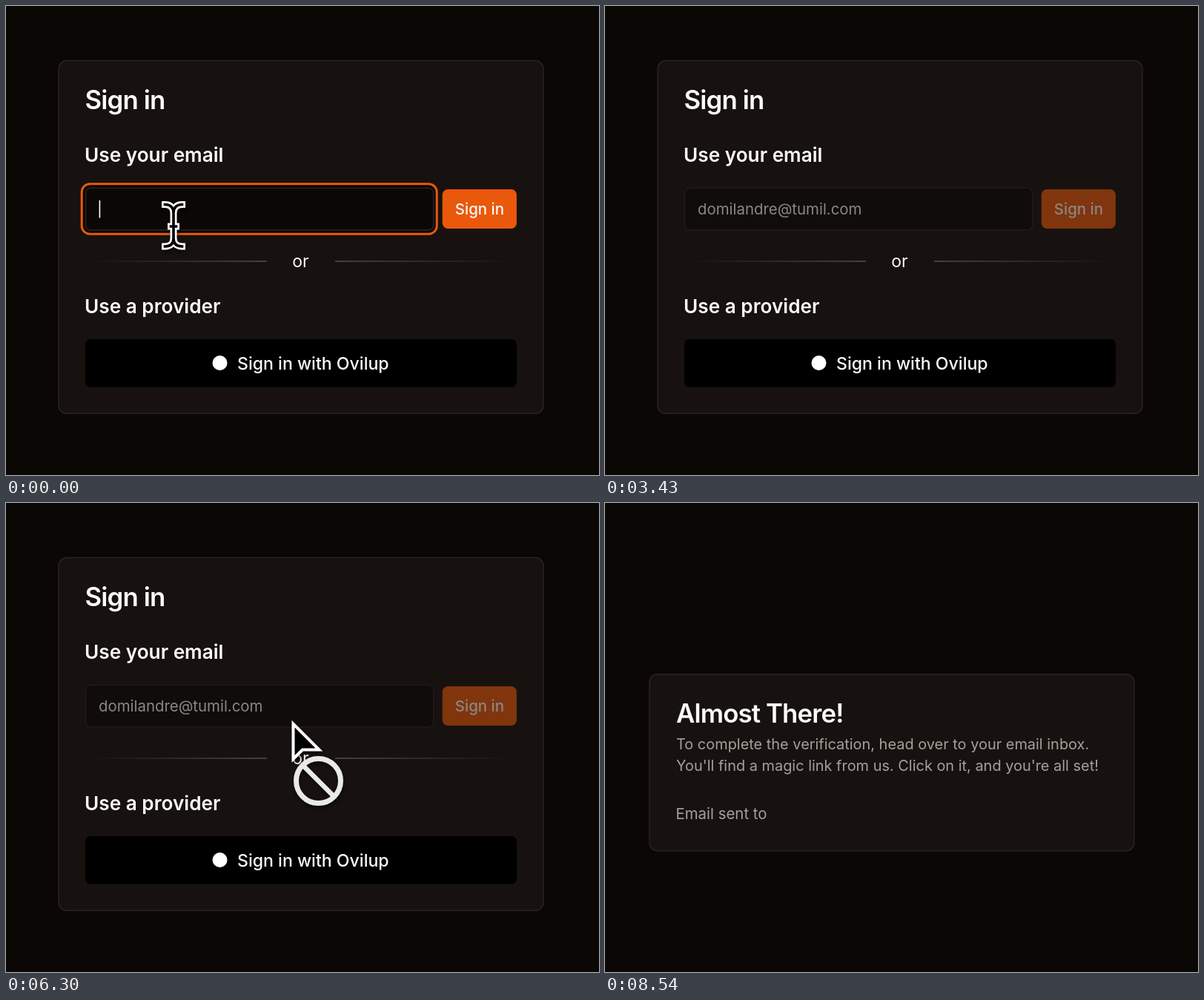
An HTML page for the animation above (9030 ms loop, 800 by 632 pixels).

```html
<!DOCTYPE html>
<html lang="en">
<head>
<meta charset="utf-8">
<title>Sign in</title>
<style>
  html, body { margin: 0; width: 100%; height: 100%; overflow: hidden; background: #0b0704; }
  svg { display: block; width: 100vw; height: 100vh; }
  text { font-family: Inter, "Noto Sans", sans-serif; font-optical-sizing: none; fill: #fafaf9; white-space: pre; }
  .title { font-size: 34.8px; font-weight: 600; letter-spacing: -.025em; }
  .label { font-size: 26.2px; font-weight: 600; }
  .small { font-size: 20.4px; }
  .body { font-size: 19.93px; }
  .medium { font-weight: 500; }
  .muted { fill: #a5a09c; }
  .card { fill: #17120f; stroke: #2b2725; stroke-width: 1.3; }
  .cursor { filter: drop-shadow(1px 3px 2px rgba(0, 0, 0, .55)); }
  .arrow { fill: #000; stroke: #fff; stroke-width: 4; }
  .beam { fill: none; stroke-linecap: square; }
</style>
</head>
<body>
<svg viewBox="0 0 800 632">
  <defs>
    <linearGradient id="fadeIn">
      <stop offset="0" stop-color="#4c4b55" stop-opacity="0"/>
      <stop offset="1" stop-color="#4c4b55"/>
    </linearGradient>
    <linearGradient id="fadeOut">
      <stop offset="0" stop-color="#4c4b55"/>
      <stop offset="1" stop-color="#4c4b55" stop-opacity="0"/>
    </linearGradient>
    <path id="beamShape" d="M214.5 267.5C222 267.5 226 272 226 279V313C226 320 222 324 214.5 324M237.5 267.5C230 267.5 226 272 226 279M226 313C226 320 230 324 237.5 324M222.5 297H229.5"/>
  </defs>
  <rect width="800" height="632" fill="#0b0704"/>

  <g id="form">
    <rect class="card" x="71" y="73.7" width="654" height="475.5" rx="11"/>
    <text class="title" x="106.5" y="139">Sign in</text>
    <text class="label" x="106" y="209.5">Use your email</text>

    <rect id="ring" x="102.2" y="239.8" width="479" height="67.4" rx="11" fill="#0b0704" stroke="#ea580c" stroke-width="3"/>
    <g id="field">
      <rect x="107.6" y="245.3" width="469" height="56.7" rx="7" fill="#0b0704" stroke="#2b2725" stroke-width="1.3"/>
      <text id="email" class="small" x="125" y="281"></text>
    </g>
    <rect id="caret" y="262" width="1.6" height="23.5" fill="#fff"/>
    <g id="submit">
      <rect x="588.7" y="247.1" width="100.2" height="52.8" rx="7.5" fill="#ea580c"/>
      <text class="small medium" x="638.9" y="281" text-anchor="middle">Sign in</text>
    </g>

    <rect x="112" y="343.2" width="240" height="1.6" fill="url(#fadeIn)"/>
    <text x="397.5" y="352" font-size="23" text-anchor="middle">or</text>
    <rect x="444" y="343.2" width="240" height="1.6" fill="url(#fadeOut)"/>

    <text class="label" x="106" y="414">Use a provider</text>
    <rect x="107" y="449" width="582" height="64.5" rx="7" fill="#000"/>
    <circle cx="288.5" cy="481" r="10" fill="#fff"/>
    <text class="medium" x="312" y="489.5" font-size="23.1">Sign in with Ovilup</text>
  </g>

  <g id="done">
    <rect class="card" x="60" y="230.6" width="654" height="238.2" rx="11"/>
    <text class="title" x="96" y="296">Almost There!</text>
    <text class="body muted" x="96" y="332">To complete the verification, head over to your email inbox.</text>
    <text class="body muted" x="96" y="361">You'll find a magic link from us. Click on it, and you're all set!</text>
    <text class="small muted" x="95.5" y="426">Email sent to</text>
  </g>

  <g id="beam" class="cursor beam">
    <use href="#beamShape" stroke="#fff" stroke-width="9"/>
    <use href="#beamShape" stroke="#000" stroke-width="3.6"/>
  </g>
  <g id="pointer" class="cursor">
    <path id="plain" class="arrow" d="M2 5V56L13 45.5L21 64L31 60L23 42H38Z"/>
    <g id="banned">
      <path class="arrow" d="M2 5V52.5L14.5 40H37Z"/>
      <path d="M14.5 60.5L57.5 103.5" stroke="#e9e9e6" stroke-width="6.5"/>
      <circle cx="36" cy="82" r="30" fill="none" stroke="#e9e9e6" stroke-width="7"/>
    </g>
  </g>
</svg>
<script>
const LOOP = 9030, STEP = 70;
const ADDRESS = 'domilandre@tumil.com';
const KEY_TIMES = [70, 490, 700, 840, 1050, 1190, 1330, 1470, 1540, 1610,
  1890, 2030, 2100, 2240, 2310, 2520, 2660, 2800, 2870, 3010];
const SENT = 3220, POINTER_SHOWN = 3920, ENABLED = 7350, DONE = 7770, POINTER_GONE = 8540;
const FIELD_BOTTOM = 302;
// time, x, y of the pointer tip
const PATH = [
  [3850, 226, 295], [4480, 385.5, 291], [6230, 385.5, 291], [6300, 385.5, 292.5],
  [6510, 385.5, 292.5], [7210, 413.8, 305.4], [8190, 413.8, 305.4], [8540, 440, 650]
];

const $ = id => document.getElementById(id);
const show = (id, on) => $(id).style.display = on ? '' : 'none';
const ease = p => p * p * (3 - 2 * p);

function pointerAt(t) {
  const i = PATH.findIndex(p => p[0] >= t);
  if (i < 1) return PATH.at(i).slice(1);
  const [t0, x0, y0] = PATH[i - 1], [t1, x1, y1] = PATH[i];
  const k = ease((t - t0) / (t1 - t0));
  return [x0 + (x1 - x0) * k, y0 + (y1 - y0) * k];
}

function draw(t) {
  const typed = KEY_TIMES.filter(k => k <= t).length;
  const waiting = t >= SENT && t < ENABLED;
  const [x, y] = pointerAt(t);

  show('form', t < DONE);
  show('done', t >= DONE);
  show('ring', t < SENT);
  show('caret', t < SENT);
  $('field').style.opacity = $('submit').style.opacity = waiting ? .5 : 1;

  const email = $('email');
  email.textContent = ADDRESS.slice(0, typed);
  $('caret').setAttribute('x', 125.6 + (typed ? email.getComputedTextLength() - .8 : 0));

  show('beam', !typed);
  show('pointer', t >= POINTER_SHOWN && t < POINTER_GONE);
  const banned = waiting && y < FIELD_BOTTOM;
  show('banned', banned);
  show('plain', !banned);
  $('pointer').setAttribute('transform', `translate(${x} ${y})`);
}

const start = performance.now();
function tick() {
  const t = (performance.now() - start) % LOOP;
  draw(Math.floor(t / STEP) * STEP);
  requestAnimationFrame(tick);
}
tick();
</script>
</body>
</html>
```
